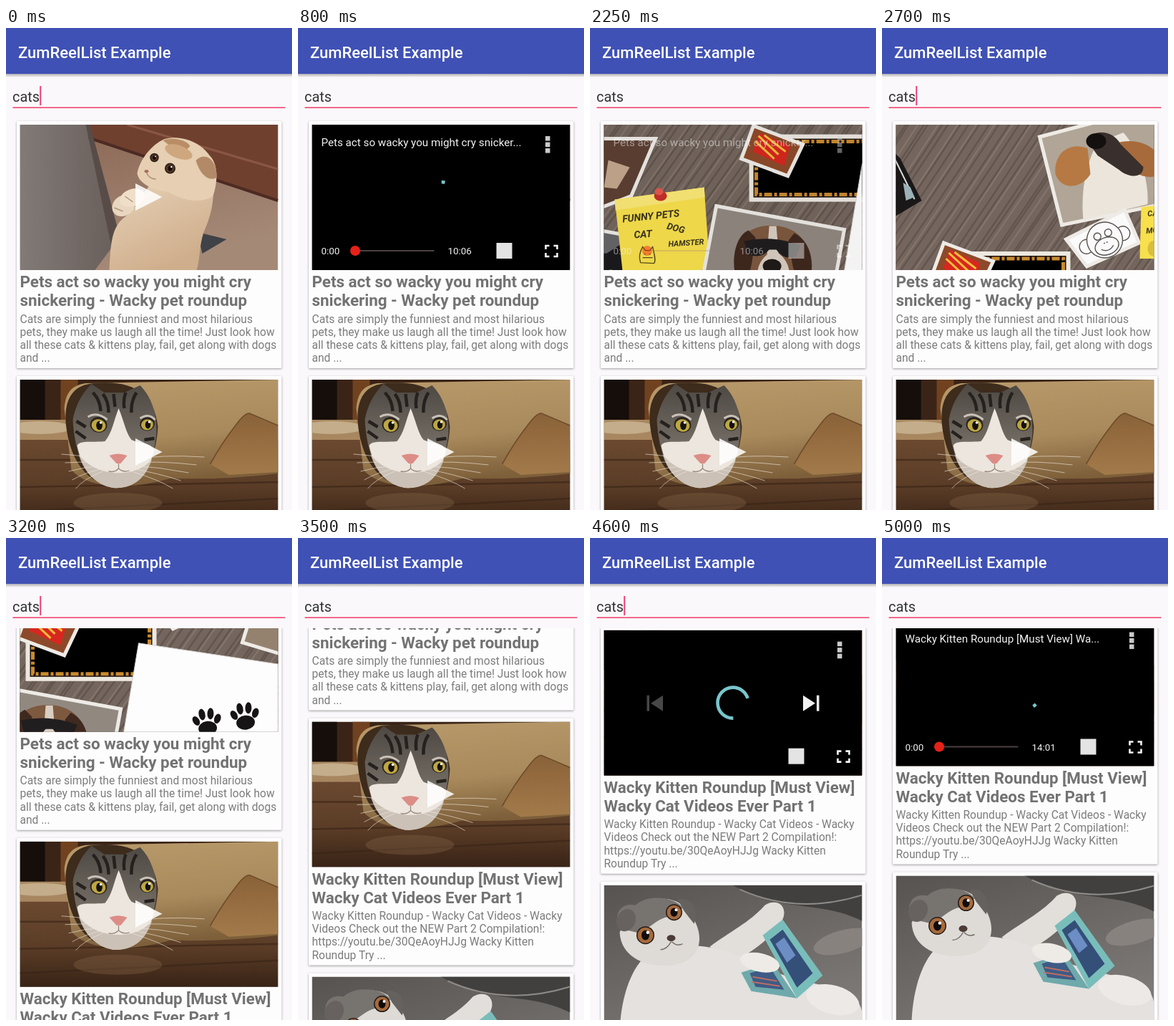
Recreate the animation shown at these times as an HTML page. Size 400 by 673 pixels, loop 5050 ms.

```html
<!DOCTYPE html>
<html lang="en">
<head>
<meta charset="utf-8">
<title>ZumReelList Example</title>
<style>
html, body { margin: 0; width: 100%; height: 100%; overflow: hidden; background: #faf8fb; }
svg text { font-family: Roboto, sans-serif; white-space: pre; }
#stage { display: block; width: 100vw; height: 100vh; }
.card { fill: #fefdfe; filter: drop-shadow(0 1px 1.8px rgba(0,0,0,.38)); }
.title { font-size: 22.4px; font-weight: 700; fill: #727272; }
.desc { font-size: 15.6px; fill: #7c7c7c; }
.ctl { fill: #f2f2f2; }
.hand { font-weight: 700; font-style: italic; fill: #3c3520; }
</style>
</head>
<body>
<svg id="stage" viewBox="0 0 400 673" preserveAspectRatio="none">
  <defs>
    <clipPath id="listClip"><rect y="126" width="400" height="547"/></clipPath>
    <linearGradient id="shade" x2="0" y2="1">
      <stop offset="0" stop-color="#000" stop-opacity=".3"/><stop offset="1" stop-color="#000" stop-opacity="0"/>
    </linearGradient>
    <linearGradient id="panel"><stop offset="0" stop-color="#817a77"/><stop offset="1" stop-color="#6a605c"/></linearGradient>
    <linearGradient id="floor" x2=".4" y2="1"><stop offset="0" stop-color="#8a6553"/><stop offset="1" stop-color="#a58977"/></linearGradient>
    <linearGradient id="cream" x2=".5" y2="1"><stop offset="0" stop-color="#e9d5bb"/><stop offset="1" stop-color="#cfae8c"/></linearGradient>
    <linearGradient id="bag" x2=".2" y2="1"><stop offset="0" stop-color="#b99a6b"/><stop offset=".6" stop-color="#a98a5c"/><stop offset="1" stop-color="#7d5f3a"/></linearGradient>
    <linearGradient id="flap" x2="0" y2="1"><stop offset="0" stop-color="#8a6238"/><stop offset="1" stop-color="#a27a4a"/></linearGradient>
    <linearGradient id="planks" x2="0" y2="1"><stop offset="0" stop-color="#6b4930"/><stop offset=".55" stop-color="#5a3c26"/><stop offset="1" stop-color="#382316"/></linearGradient>
    <linearGradient id="tabby" x2="0" y2="1"><stop offset="0" stop-color="#4d4842"/><stop offset="1" stop-color="#8c857c"/></linearGradient>
    <linearGradient id="rug" x2=".6" y2="1"><stop offset="0" stop-color="#565350"/><stop offset="1" stop-color="#7d7976"/></linearGradient>
  </defs>
  <rect width="400" height="673" fill="#faf8fb"/>
  <g id="list" clip-path="url(#listClip)"><g id="cards"></g></g>
  <rect y="64" width="400" height="5" fill="url(#shade)"/>
  <rect width="400" height="64" fill="#3f51b5"/>
  <text x="17" y="41.5" font-size="22" font-weight="500" fill="#fff">ZumReelList Example</text>
  <text x="9" y="102.5" font-size="19.9" fill="#333">cats</text>
  <rect x="9.5" y="110.4" width="381" height="1.6" fill="#f0486f"/>
  <rect id="caret" x="47.2" y="81" width="2" height="27" fill="#f0407a"/>
</svg>
<script>
const $ = id => document.getElementById(id);
const poly = (pts, fill, more = '') => `<polygon points="${pts}" fill="${fill}" ${more}/>`;
const path = (d, fill, more = '') => `<path d="${d}" fill="${fill}" ${more}/>`;
const oval = (x, y, rx, ry, fill, turn = 0) =>
  `<ellipse cx="${x}" cy="${y}" rx="${rx}" ry="${ry}" fill="${fill}" transform="rotate(${turn} ${x} ${y})"/>`;
const box = (x, y, w, h, fill, more = '') => `<rect x="${x}" y="${y}" width="${w}" height="${h}" fill="${fill}" ${more}/>`;
const label = (x, y, cls, size, str, turn = 0) =>
  `<text class="${cls}" font-size="${size}" transform="translate(${x} ${y}) rotate(${turn})">${str}</text>`;
const line = (d, color, w) => path(d, 'none', `stroke="${color}" stroke-width="${w}"`);
const photo = (pts, fill) => poly(pts, fill, 'stroke="#eeebe6" stroke-width="5"');
const eye = (x, y, r, iris) => oval(x, y, r + 1.5, r + 1.5, '#221b17') + oval(x, y, r, r, iris) +
  oval(x, y, r * .5, r * .62, '#100d0b') + oval(x + r * .3, y - r * .35, r * .2, r * .2, '#fff');

const kitten = () =>
  box(0, 0, 361, 203, 'url(#floor)') +
  poly('95,0 361,0 361,106 95,18', '#70402f') +
  line('M95 18L361 106', '#4c2b23', 4) + line('M150 0L361 62', '#8a5744', 3) +
  poly('0,0 92,0 128,172 105,203 0,203', 'url(#panel)') +
  poly('92,0 98,0 138,150 128,172', '#574c48') +
  poly('248,150 289,160 255,180', '#3f4247') +
  path('M125 203C127 165 128 142 148 128C172 108 180 76 200 66L268 74C274 100 268 126 257 150C250 172 252 190 247 203Z', 'url(#cream)') +
  path('M164 68C168 48 184 28 202 20C226 14 252 24 266 44C276 54 278 76 270 100C250 112 224 104 208 94C186 92 166 82 164 68Z', '#e6cfb2') +
  path('M200 22C214 16 234 22 238 30L226 42Z', '#b98e66') +
  path('M246 50C260 36 276 50 275 74C264 80 252 70 246 50Z', '#b38a68') +
  oval(222, 38, 20, 9, '#cfa77f', 20) +
  eye(188, 46, 4.7, '#5a3522') + eye(210, 61, 6, '#5a3522') +
  oval(177, 65, 3, 2, '#a96c5d') + line('M177 67Q181 76 190 76', '#a88469', 1.4) +
  oval(145, 113, 17, 14, '#e8d6c0', -35) + oval(157, 102, 18, 12, '#efdfca', -20) +
  line('M132 116L144 121M147 100L158 108', '#b39379', 1.4);

const bagCat = () => {
  let whiskers = '';
  for (let i = 0; i < 5; i++) {
    whiskers += `M156 ${112 + i * 4}Q195 ${104 + i * 9} ${258 - i * 11} ${108 + i * 11}`;
    whiskers += `M116 ${112 + i * 4}Q90 ${106 + i * 8} ${58 + i * 5} ${104 + i * 12}`;
  }
  const lid = (x, y, r, turn) => oval(x, y, r, r * .9, '#2a2420', turn) +
    oval(x, y + 1, r - 2, r * .72, '#bda742', turn) + oval(x + 1, y + 1, r * .36, r * .52, '#14100c') +
    oval(x + 3, y - 3, 1.8, 1.8, '#fff');
  return box(0, 0, 361, 203, '#3a2417') + box(0, 0, 35, 56, '#150e0a') + box(57, 0, 24, 58, '#70421f') +
    box(0, 56, 100, 30, '#a88760') + oval(28, 67, 45, 9, '#c4ad8a') +
    box(0, 84, 361, 119, 'url(#planks)') +
    line('M0 112H80M0 150L361 143M0 184L361 166', '#38241799', 2.5) + oval(137, 172, 62, 14, '#8a6a4c55') +
    path('M62 40C64 18 72 8 92 5L361 0V131Q290 140 210 138C170 150 100 158 72 126Z', 'url(#bag)') +
    path('M266 118Q284 86 300 66Q314 46 321 47Q338 56 361 64V129L292 133Z', 'url(#flap)') +
    line('M266 118Q284 86 300 66Q314 46 321 47L361 64', '#6d4b2a', 1.6) +
    path('M64 60C62 24 76 7 104 5C162 0 188 22 193 66C190 116 168 147 140 150C102 150 70 122 64 60Z', '#3d2b1c') +
    path('M74 56C78 34 88 18 100 6L118 18H146L168 8C184 24 192 48 191 74C188 112 170 140 148 149C106 152 78 126 74 56Z', 'url(#tabby)') +
    path('M138 40C131 58 129 74 119 86C100 88 84 84 80 92C86 122 104 146 130 151C158 153 178 136 188 98C180 86 168 90 156 84C148 74 145 56 138 40Z', '#ece6df') +
    path('M82 104C90 130 106 147 130 151C158 153 176 138 185 110C168 136 108 140 82 104Z', '#cbc1b6') +
    line('M102 18Q112 28 113 44M116 20Q124 30 124 46M131 20L133 38M148 18Q144 28 146 40M163 18Q155 30 156 46M78 72L92 82M79 58L92 66M188 82L174 84', '#25211e', 4.5) +
    line('M95 52Q108 44 122 56M168 54Q180 46 189 56', '#c9c2b8', 3) +
    lid(110, 63, 12, 12) + lid(178, 62, 10.5, -12) +
    path('M125 106Q137 101 150 106L141 117H135Z', '#dc8d86') +
    line('M138 117V124M124 128Q133 130 138 124Q144 130 153 127', '#9a8a7e', 1.3) +
    line(whiskers, '#efe7dcb0', .9);
};

const laptopCat = () =>
  box(0, 0, 361, 203, 'url(#rug)') + path('M180 0H361V50C300 20 250 40 180 0Z', '#42403e') +
  line('M190 6Q270 42 361 14', '#8e8a87', 2) + oval(334, 79, 42, 16, '#88827f', -15) +
  path('M148 86C174 66 204 52 225 28C246 16 260 34 247 53C230 78 205 94 180 108Z', '#e2deda') +
  path('M62 96C120 74 170 86 226 116C284 142 358 140 361 178V203H22C24 160 36 116 62 96Z', '#e4e1de') +
  path('M22 66C30 50 34 34 50 26C74 14 108 16 122 42C142 70 136 102 104 110C70 118 24 106 22 66Z', '#dedad6') +
  path('M20 60C14 38 24 24 44 28C60 12 100 16 110 32L92 44C72 46 66 62 46 66Z', '#77736f') +
  path('M103 20C122 16 134 32 126 54L112 36Z', '#65615e') + oval(31, 49, 13, 16, '#67625f', 25) +
  eye(58, 70, 11, '#a66a3d') + eye(98, 38, 10, '#a66a3d') +
  oval(94, 74, 6, 4.5, '#4b3b37') + line('M94 79Q88 90 79 90M95 79Q102 86 110 82', '#76706b', 1.5) +
  poly('192,122 236,108 270,158 206,148', '#6fa9ab') + poly('204,123 232,114 252,146 212,142', '#3e5b85') +
  line('M208 128L242 134M207 135L246 141', '#bd6b62', 2) +
  poly('222,70 250,48 306,126 270,158', '#79bdbb') + poly('232,76 250,62 292,123 270,143', '#344f78') +
  poly('240,82 252,73 268,98 256,108', '#6c8ec4') +
  oval(218, 108, 28, 13, '#eeebe7', 12) + oval(320, 160, 38, 20, '#ece9e6', 15);

const paw = (x, y) => `<g transform="translate(${x} ${y}) rotate(-6)">` + oval(0, 6, 13, 10, '#161414') +
  oval(-15, -6, 4.5, 7, '#161414', -25) + oval(-6, -14, 4.5, 8, '#161414', -6) +
  oval(6, -14, 4.5, 8, '#161414', 8) + oval(15, -6, 4.5, 7, '#161414', 25) + '</g>';

// Desk covered with pet pictures; the camera pans over it.
const desk = () => {
  let dark = '', light = '';
  for (let i = 0; i < 125; i++) {
    const x = -430 + i * 9 + 3 * Math.sin(i * 2.3);
    const d = `M${x.toFixed(1)} 260Q${(x + 170).toFixed(1)} 60 ${(x + 400).toFixed(1)} -300`;
    if (i % 3) dark += d; else light += d;
  }
  return box(-80, -300, 800, 560, '#74665e') + line(dark, '#62554d', 2.4) + line(light, '#85766c', 2) +
    photo('-25,-40 118,-40 84,40 -20,80', '#5d4034') + path('M8 -10L35 -6L30 42L10 56Z', '#b08f74') +
    path('M52 -10L82 0L64 30L46 28Z', '#c4a78d') +
    photo('-30,75 84,96 66,235 -30,235', '#66676a') +
    path('M-20 210L-12 100L14 122L50 120L84 98V160L66 230Z', '#1b1b1d') +
    oval(16, 148, 5, 3, '#a4a284', 15) + oval(54, 146, 5, 3, '#a4a284', -15) +
    poly('61,45 186,28 194,142 73,155', '#f8e04c') + poly('61,45 186,28 187,42 62,60', '#fbe976') +
    oval(125, 40, 9, 7, '#c62f2a') + oval(123, 34, 6, 5, '#e4574c') +
    label(72, 77, 'hand', 14, 'FUNNY PETS', -6) + label(88, 99, 'hand', 14, 'CAT', -4) +
    label(133, 86, 'hand', 13, 'DOG', 14) + label(136, 111, 'hand', 11, 'HAMSTER', -4) +
    path('M97 133C94 124 97 116 100 111L104 116H110L114 111C116 120 119 130 116 134Z', 'none', 'stroke="#5a4c1c" stroke-width="1.4"') +
    line('M102 121H104M109 121H111M100 126H114', '#5a4c1c', 1.2) +
    box(249, -46, 183, 94, '#ece8e0') + box(255, -40, 171, 82, '#1a110b') +
    box(259, -36, 163, 74, '#000', 'stroke="#c98a2e" stroke-width="5" stroke-dasharray="11 3 4 3"') +
    photo('203,54 382,87 355,235 176,196', '#918980') +
    path('M206 212C218 176 236 150 252 152L318 158C340 180 348 210 346 232Z', '#5c4032') +
    path('M240 98C256 74 310 76 324 102L324 150C316 178 250 174 242 146Z', '#7d593f') +
    path('M248 88C224 98 222 152 238 166C254 154 254 116 258 98Z', '#40291f') +
    path('M312 92C342 106 342 154 326 168C308 154 308 120 304 102Z', '#40291f') +
    path('M277 82H287L290 120C312 136 310 168 282 170C256 170 254 138 274 122Z', '#d9cec2') +
    path('M242 103Q282 94 321 109L315 124Q298 131 287 115H277Q266 129 247 121Z', '#211e20') +
    oval(281, 138, 13, 10, '#211b1a') + line('M281 146V160', '#483a34', 2) +
    photo('255,-58 324,-32 303,12 238,-12', '#8d4a2a') +
    path('M254 -22L264 -48L306 -30L298 -2Z', '#d7271f') +
    line('M262 -44L290 -18M270 -45L300 -22M258 -36L284 -12', '#f2be3b', 3) +
    poly('180,-190 194,-176 224,-117 182,-92', '#191717') +
    line('M186 -176L214 -119', '#ddd', 2) + poly('198,-142 208,-136 214,-122 202,-117', '#9bb0b7') +
    photo('389,-206 568,-253 590,-118 420,-83', '#b0a597') +
    path('M450 -90C446 -130 454 -170 470 -198L506 -212C526 -190 542 -150 540 -112Z', '#ece5dc') +
    path('M456 -190C430 -200 408 -182 411 -154C420 -130 448 -134 460 -154Z', '#b67943') +
    path('M498 -198C530 -206 560 -190 564 -160C552 -142 520 -150 504 -172Z', '#a76a3b') +
    path('M456 -200C462 -218 492 -216 502 -196L534 -164C534 -148 514 -148 500 -160L470 -180Z', '#39302d') +
    oval(468, -200, 14, 11, '#14100f') +
    photo('426,-63 508,-104 528,-58 455,-25', '#fbfafa') +
    `<g fill="#fbfafa" stroke="#57514f" stroke-width="1.4" transform="translate(480 -62) rotate(-20)">
      <circle cx="-27" r="10"/><circle cx="27" r="10"/><circle r="25"/><ellipse cy="9" rx="17" ry="12"/>
      <circle cx="-8" cy="-8" r="5"/><circle cx="8" cy="-8" r="5"/><path d="M-9 11Q0 19 9 11M-3 4H-1M1 4H3" fill="none"/></g>` +
    poly('531,-108 590,-114 588,-36 529,-36', '#f8e04c') +
    label(540, -95, 'hand', 11, 'CAT', -4) + label(538, -71, 'hand', 11, 'MOUSE', -4) +
    oval(548, -50, 8, 11, '#d8be3c') +
    photo('566,-50 640,-40 625,16 552,-6', '#94826f') +
    poly('407,-5 640,30 620,240 366,240', '#fdfdfd', 'stroke="#d6d2ce"') + paw(503, 108) + paw(556, 100);
};

const scene = { kitten, bagCat, laptopCat };
const skip = dir => `<g transform="translate(${180.5 + dir * 109} 102) scale(${dir} 1)" fill="${dir < 0 ? '#474747' : '#f0f0f0'}">
  <path d="M-11 -11L6 0L-11 11Z"/><rect x="8" y="-11" width="3.5" height="22"/></g>`;

const player = (n, title, total) => `<g id="player${n}">
  <rect width="361" height="203"/>
  ${n ? '' : `<g id="video"><g id="camera">${desk()}</g></g>`}
  <g id="ctl${n}"><rect width="361" height="203" opacity=".08"/>
    <g id="skip${n}">${skip(-1) + skip(1)}</g>
    <g id="info${n}">${label(13, 30, 'ctl', 15.2, title)}${label(13, 181, 'ctl', 13.4, '0:00')}
      <rect x="66" y="175" width="105" height="2" fill="#8a7575" opacity=".55"/>
      <circle cx="60.5" cy="176" r="7" fill="#e62117"/>${label(190, 181, 'ctl', 13.4, total)}</g>
    ${[17, 25.5, 34].map(y => box(326.5, y - 1, 6.5, 6.5, '#c9c9c9')).join('')}
    <rect x="258" y="165" width="22" height="22" fill="#e4e4e4"/>
    <path d="M327 174V169H332M338 169H343V174M343 179V184H338M332 184H327V179" fill="none" stroke="#f5f5f5" stroke-width="2.6"/></g>
  <circle id="spin${n}" cx="180.5" cy="101.5" r="21.5" fill="none" stroke="#78c5cc" stroke-width="4.6" pathLength="1"/></g>`;

const items = [
  { pic: 'kitten', head: ['Pets act so wacky you might cry', 'snickering - Wacky pet roundup'],
    short: 'Pets act so wacky you might cry snicker...', total: '10:06',
    body: ['Cats are simply the funniest and most hilarious', 'pets, they make us laugh all the time! Just look how',
      'all these cats &amp; kittens play, fail, get along with dogs', 'and ...'] },
  { pic: 'bagCat', head: ['Wacky Kitten Roundup [Must View]', 'Wacky Cat Videos Ever Part 1'],
    short: 'Wacky Kitten Roundup [Must View] Wa...', total: '14:01',
    body: ['Wacky Kitten Roundup - Wacky Cat Videos - Wacky', 'Videos Check out the NEW Part 2 Compilation!:',
      'https://youtu.be/30QeAoyHJJg Wacky Kitten', 'Roundup Try ...'] },
  { pic: 'laptopCat', head: [], body: [] }
];

$('cards').innerHTML = items.map((c, n) => `<g transform="translate(19.5 ${135 + 356 * n})">
  <rect class="card" x="-4.5" y="-5" width="370.5" height="345" rx="1.5"/>
  <svg width="361" height="203" viewBox="0 0 361 203">${scene[c.pic]()}
    ${n < 2 ? poly('161.5,82 199,101 161.5,120', '#fff', 'opacity=".86"') + player(n, c.short, c.total) : ''}</svg>
  ${c.head.map((s, i) => `<text class="title" x="0" y="${227 + i * 26.2}">${s}</text>`).join('')}
  ${c.body.map((s, i) => `<text class="desc" x="0" y="${276.5 + i * 18.2}">${s}</text>`).join('')}</g>`).join('');

const LOOP = 5050, STEP = 50;
const clamp = u => Math.min(1, Math.max(0, u));
const smooth = (t, a, b) => { const u = clamp((t - a) / (b - a)); return u * u * (3 - 2 * u); };
const show = (id, on) => $(id).setAttribute('display', on ? 'inline' : 'none');
const fade = (id, o) => $(id).setAttribute('opacity', o);

// Camera stops: time, x, y
const stops = [[2000, 0, 0], [2100, 0, 0], [2700, 188, -223], [3200, 241, -84], [3700, 300, 0], [4200, 320, 20]];
function pan(t, k) {
  if (t <= 2100) return 0;
  let i = 1;
  while (i < 3 && t > stops[i + 1][0]) i++;
  const [a, b, c, d] = stops.slice(i - 1, i + 3);
  const u = clamp((t - b[0]) / (c[0] - b[0])), w = c[0] - b[0];
  const m0 = (c[k] - a[k]) / (c[0] - a[0]) * w, m1 = (d[k] - b[k]) / (d[0] - b[0]) * w;
  return (2 * u ** 3 - 3 * u * u + 1) * b[k] + (u ** 3 - 2 * u * u + u) * m0 +
    (3 * u * u - 2 * u ** 3) * c[k] + (u ** 3 - u * u) * m1;
}

// Indeterminate ring: the head runs ahead, then the tail catches up.
function spin(n, t, from, turn) {
  const ms = Math.max(0, t - from) * 2, p = ms / 1333 % 1;
  const tail = .75 * smooth(p, .5, 1), head = .75 * smooth(p, 0, .5);
  const len = Math.max(.036, head - tail);
  const angle = turn - 90 + 360 * (tail + p / 4 + ms / 2222);
  const ring = $('spin' + n);
  ring.setAttribute('stroke-dasharray', `${len} ${1 - len}`);
  ring.setAttribute('transform', `rotate(${angle} 180.5 101.5)`);
}

function draw(t) {
  show('caret', Math.floor((t + 10) / 251) % 2 === 0);
  const scroll = 249 * smooth(t, 3000, 3586) + 126.5 * smooth(t, 4200, 4700);
  $('cards').setAttribute('transform', `translate(0 ${-scroll})`);

  show('player0', t >= 400);
  show('video', t >= 1400);
  show('skip0', t < 700);
  show('info0', t >= 700);
  fade('ctl0', 1 - smooth(t, 2150, 2350));
  show('spin0', t < 2100);
  if (t < 700) spin(0, t, 400, 0); else spin(0, t, 133.5, -214);
  $('camera').setAttribute('transform', `translate(${-pan(t, 1)} ${-pan(t, 2)})`);

  show('player1', t >= 3700);
  show('skip1', t < 4650);
  show('info1', t >= 4650);
  if (t < 4650) spin(1, t, 3650, -167); else spin(1, t, 4333.5, -81);
}

const start = performance.now();
function tick() {
  const t = (performance.now() - start) % LOOP;
  draw(Math.floor(t / STEP) * STEP);
  requestAnimationFrame(tick);
}
tick();
</script>
</body>
</html>
```
